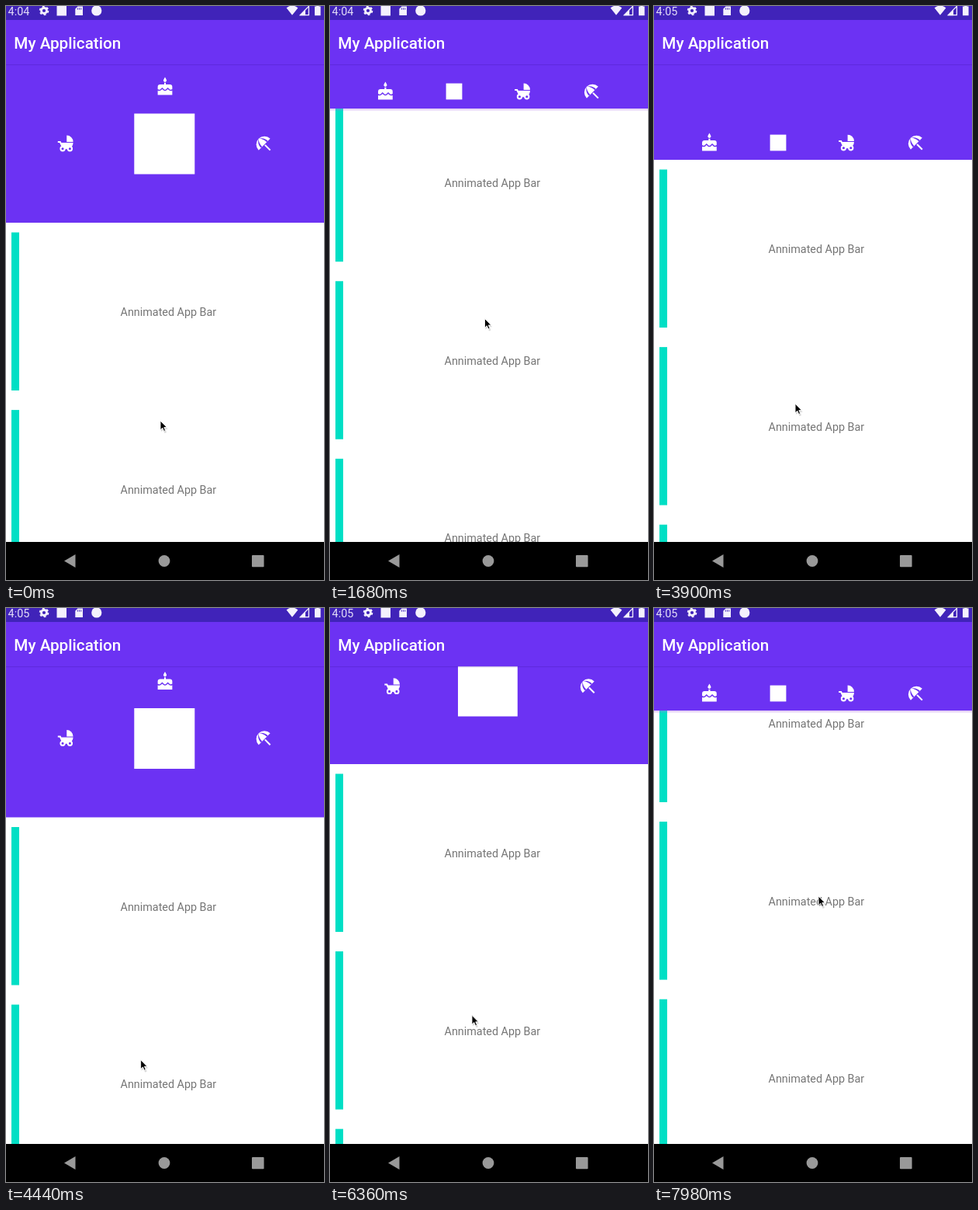
Animation of 410 by 739 pixels, one loop 8 s. Source, as an HTML page:

```html
<!DOCTYPE html>
<html lang="en">
<head>
<meta charset="utf-8">
<title>Animated app bar</title>
<style>
  html, body { margin: 0; width: 100%; height: 100%; overflow: hidden; background: #fff; }
  svg { display: block; width: 100%; height: 100%; }
  text { font-family: Roboto, sans-serif; }
  .bar { fill: #6c32f3; }
  .line { fill: none; stroke: #6c32f3; }
</style>
</head>
<body>
<svg viewBox="0 0 410 739">
  <rect width="410" height="739" fill="#fff"/>
  <g id="list"></g>

  <rect id="shade" y="132" width="410" height="2.5" fill="#b070e0" opacity=".3"/>
  <rect id="header" class="bar" y="18" width="410"/>
  <g fill="#fff">
    <g id="cake">
      <path d="M12 0L10.3 3A2 2 0 1 0 13.7 3zM11 7h2v3h-2z"/>
      <path d="M6 9H18a3 3 0 0 1 3 3V22H3V12a3 3 0 0 1 3-3z"/>
      <path class="line" stroke-width="1.5" d="M2.5 15.6Q5 17 6.7 15.6L8.5 13.9 10.3 15.6Q12 17 13.7 15.6L15.5 13.9 17.3 15.6Q19 17 21.5 15.6"/>
    </g>
    <rect id="block" x="2" y="2" width="20" height="20"/>
    <g id="stroller">
      <path d="M13 2v8h8a8 8 0 0 0-8-8z"/>
      <path d="M2 9H5.5L6.4 11H21Q21 13.8 19.3 15.9L16 19H9L6.3 15.4 4.2 11H2z"/>
      <g class="bar" stroke="#fff" stroke-width="2">
        <circle cx="8" cy="18.5" r="2.5"/>
        <circle cx="17" cy="18.5" r="2.5"/>
      </g>
    </g>
    <g id="umbrella">
      <path d="M6 20.3A10.1 10.1 0 0 1 20.3 6z"/>
      <path class="bar" d="M6 6C4.7 9.9 5.7 14.3 8.8 17.4L10.3 16C7.1 12.8 5.6 9 6 6C9.9 4.7 14.3 5.7 17.4 8.8L16 10.3C12.8 7.1 9 5.6 6 6z"/>
      <path d="M13.8 13.8L20.3 20.3" stroke="#fff" stroke-width="2"/>
    </g>
  </g>

  <!-- toolbar -->
  <rect class="bar" y="18" width="410" height="57"/>
  <rect y="75" width="410" height="1.2" fill="#4a1cb8" opacity=".35"/>
  <text x="10.3" y="54.8" font-size="20.7" font-weight="500" fill="#fff">My Application</text>

  <!-- status bar -->
  <rect width="410" height="18" fill="#4023b9"/>
  <g fill="#f4f1fd" stroke="#f4f1fd" stroke-width="0">
    <text id="clock" x="2.6" y="11.8" font-size="14.4" fill="#e4dff8"></text>
    <circle cx="49" cy="6" r="3.5" fill="none" stroke-width="2.8"/>
    <circle cx="49" cy="6" r="5.4" fill="none" stroke-width="1.8" stroke-dasharray="2.83 2.825"/>
    <rect x="65.5" width="12.5" height="12.5"/>
    <path d="M92.5 .5H99V12H89.3V3.7z"/>
    <path d="M92.3 2.5v2.2m2.2 0v-2.2m2.2 0v2.2" stroke="#4023b9" stroke-width="1"/>
    <circle cx="116.8" cy="6" r="6.6"/>
    <path d="M361.6 2.4Q369 -3.4 376.4 2.4L369 11.8z"/>
    <path d="M379.4 11.6h11V.4z" fill="none" stroke-width="1.3"/>
    <path d="M378.6 12.2H386V4.4z"/>
    <path d="M398 .5h2V-1h3.6V.5h2V12.2H398z"/>
  </g>

  <!-- navigation bar -->
  <rect y="690" width="410" height="49"/>
  <g fill="#999">
    <path d="M75 714.5L89.5 706V723z"/>
    <circle cx="204" cy="714.5" r="7.4"/>
    <rect x="317" y="707" width="15.6" height="15.2" rx="1"/>
  </g>

  <g id="cursor">
    <path d="M1 2V14L3.8 11.6 5.6 16 8 15 6.2 10.8H9.8z" opacity=".15"/>
    <path d="M0 0V11.8L2.8 9.2 4.6 13.4 6.6 12.5 4.8 8.5H8.4z" stroke="#fff" stroke-width=".9"/>
  </g>
</svg>
<script>
const LOOP = 8000, STEP = 60;
const LAG = 60;      // the view trails the pointer
const RANGE = 147;   // how far the header collapses
const TRIGGER = RANGE * .47, MORPH = 400;
const PITCH = 228.6;

const $ = id => document.getElementById(id);
const mix = (a, b, p) => a + (b - a) * p;
const clamp = v => Math.min(1, Math.max(0, v));
const place = (id, x, y, s = 1) => $(id).setAttribute('transform', `translate(${x} ${y}) scale(${s})`);

const easeOut = x => 1 - (1 - x) ** 1.5;
const easeOutInverse = p => 1 - (1 - p) ** (1 / 1.5);
const easeInOut = x => x < .5 ? 4 * x ** 3 : 1 - 4 * (1 - x) ** 3;

// each gesture moves on from where the last one ended
const rest = { x: 199, y: 534, scroll: 0 };
const gestures = [
  { at: 60,   time: 780,  x: 211.5, y: 586.5, scroll: 0 },
  { at: 900,  time: 1010, x: 198,   y: 380,   scroll: 196 },
  { at: 3270, time: 1280, x: 173,   y: 587,   scroll: 0 },
  { at: 5340, time: 560,  x: 181,   y: 615,   scroll: 0 },
  { at: 5940, time: 1282, x: 185.4, y: 413,   scroll: 200 },
  { at: 7240, time: 660,  x: 212,   y: 371,   scroll: 245 }
];

function track(key, t) {
  return gestures.reduce((v, g) => mix(v, g[key], easeOut(clamp((t - g.at) / g.time))), rest[key]);
}

// the icons rearrange on their own clock once the scroll passes the trigger
const morphs = gestures.flatMap((g, i) => {
  const from = (gestures[i - 1] || rest).scroll, p = (TRIGGER - from) / (g.scroll - from);
  return p > 0 && p < 1
    ? [{ at: g.at + LAG + easeOutInverse(p) * g.time, to: +(g.scroll > from) }] : [];
});
const compactness = t => morphs.reduce((v, m) => mix(v, m.to, easeInOut(clamp((t - m.at) / MORPH / 1.2 + .08 * (t >= m.at)))), 0);

// spread layout, measured from the header's bottom edge
const icons = [
  { id: 'cake', x: 205, y: -175, size: 1.04 },
  { id: 'block', x: 204.3, y: -101.5, size: 3.9 },
  { id: 'stroller', x: 77.2, y: -102, size: 1.04 },
  { id: 'umbrella', x: 332, y: -102, size: 1.04 }
];

$('list').innerHTML = [0, 1, 2].map(i => `
  <g transform="translate(0 ${i * PITCH})">
    <rect x="7" y="291.5" width="10" height="203.5" fill="#00dfc5"/>
    <text x="209.4" y="399" text-anchor="middle" font-size="14.35" fill="#757575">Annimated App Bar</text>
  </g>`).join('');

function draw(t) {
  const scroll = track('scroll', t - LAG);
  const bottom = 279 - Math.min(RANGE, scroll);
  const p = compactness(t);

  place('list', 0, -scroll);
  $('header').setAttribute('height', bottom - 18);
  $('shade').setAttribute('visibility', scroll > RANGE + 10 ? 'visible' : 'hidden');
  icons.forEach((icon, i) => {
    const s = mix(icon.size, 1.04, p);
    place(icon.id, mix(icon.x, 71.4 + 88.6 * i, p) - 12 * s, bottom + mix(icon.y, -22, p) - 12 * s, s);
  });
  $('clock').textContent = t < 3600 ? '4:04' : '4:05';
  place('cursor', track('x', t), track('y', t));
}

const begin = performance.now();
function tick() {
  const t = (performance.now() - begin) % LOOP;
  draw(Math.floor(t / STEP) * STEP);
  requestAnimationFrame(tick);
}
tick();
</script>
</body>
</html>
```
